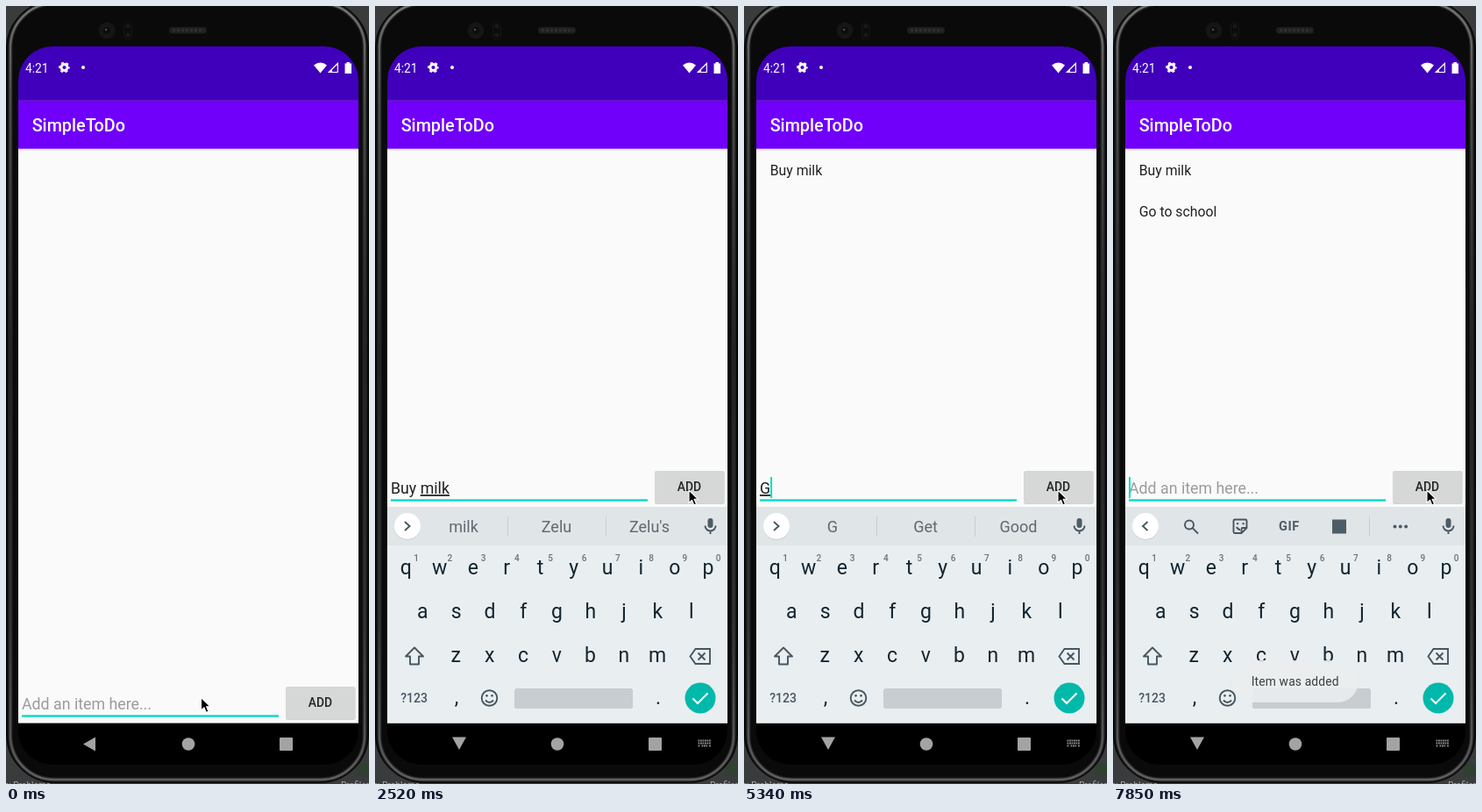
Animation, 414 px wide and 887 px high, one loop 8000 ms. Source, as an HTML page:

```html
<!DOCTYPE html>
<html lang="en">
<head>
<meta charset="utf-8">
<title>SimpleToDo</title>
<style>
  html, body { margin: 0; width: 100%; height: 100%; overflow: hidden; background: #2f3133; }
  svg { display: block; width: 100vw; height: 100vh; font-family: Roboto, sans-serif; }
  text { white-space: pre; }
  .mid { text-anchor: middle; }
  .medium { font-weight: 500; }
  .item { font-size: 15.8px; fill: #212121; }
  .field { font-size: 17.78px; }
  .composing { text-decoration: underline; text-decoration-thickness: 1px; text-decoration-skip-ink: none; }
  .suggestion { font-size: 18px; fill: #5f6a70; }
  .key { font-size: 23px; fill: #12252e; }
  .digit { font-size: 10px; font-weight: 500; fill: #68747a; }
  .line { fill: none; stroke: #465760; stroke-width: 1.9; }
  .solid { fill: #4d5d66; }
</style>
</head>
<body>
<svg viewBox="0 0 414 887" preserveAspectRatio="none">
  <defs>
    <clipPath id="screen"><rect x="14" y="46" width="388" height="819" rx="39"/></clipPath>
    <clipPath id="appArea"><rect x="14" y="46" width="388" height="771.6"/></clipPath>
    <linearGradient id="edge" x2="0" y2="1">
      <stop offset="0" stop-color="#777"/>
      <stop offset=".12" stop-color="#4c4c4c"/>
      <stop offset=".45" stop-color="#222"/>
      <stop offset=".8" stop-color="#333"/>
      <stop offset="1" stop-color="#606060"/>
    </linearGradient>
    <linearGradient id="barShadow" x2="0" y2="1">
      <stop offset="0" stop-color="#000" stop-opacity=".15"/>
      <stop offset="1" stop-color="#000" stop-opacity="0"/>
    </linearGradient>
  </defs>

  <!-- phone body -->
  <rect width="414" height="887" fill="#393b3d"/>
  <rect x="400" y="864" width="14" height="14" fill="#2f4030"/>
  <g font-size="10" fill="#aaa"><text x="-2" y="892">e: Problems</text><text x="382" y="892">Profiler</text></g>
  <rect x="1" y="-6" width="412" height="891" rx="55" fill="#111" stroke="#080808" stroke-width="2"/>
  <rect x="5" y="-3" width="404" height="885" rx="50" fill="#0a0a0b" stroke="#242424" stroke-width="5"/>
  <rect x="5" y="-3" width="404" height="885" rx="50" fill="none" stroke="url(#edge)" stroke-width="2.400"/>
  <circle cx="115" cy="28" r="9.500" fill="#151515"/>
  <circle cx="115" cy="28" r="5" fill="#0c0d0e" stroke="#1b1c1d"/>
  <circle cx="114" cy="27" r="1.200" fill="#4a5258"/>
  <rect x="134.500" y="18" width="9" height="21" rx="4.500" fill="#0c0c0c" stroke="#151515"/>
  <path d="M139 23v.1M139 33v.1" stroke="#191919" stroke-width="5" stroke-linecap="round"/>
  <rect x="186" y="24" width="43" height="7.500" rx="3.700" fill="#1f1f1f"/>
  <path d="M190 27.700h36" stroke="#303030" stroke-width="3" stroke-dasharray="3 2"/>

  <g clip-path="url(#screen)">
    <rect x="14" y="46" width="388" height="819" fill="#000"/>
    <rect x="14" y="107.600" width="388" height="710" fill="#fafafa"/>
    <rect x="14" y="46" width="388" height="61.600" fill="#4000bb"/>
    <rect x="14" y="107.600" width="388" height="55.100" fill="#7000fa"/>
    <rect x="14" y="162.700" width="388" height="3" fill="url(#barShadow)"/>

    <!-- status bar -->
    <g fill="#fff">
      <text x="22" y="75.500" font-size="13.800">4:21</text>
      <circle cx="66.500" cy="70" r="3.500" fill="none" stroke="#fff" stroke-width="2.800"/>
      <circle cx="66.500" cy="70" r="5.300" fill="none" stroke="#fff" stroke-width="2" stroke-dasharray="2.800 2.750" stroke-dashoffset="1.400"/>
      <circle cx="88" cy="70" r="2"/>
      <path d="M351 67.500Q358.500 61.500 366 67.500L358.500 76.500Z"/>
      <path d="M378.300 65.500V75.500H368.300Z" fill="none" stroke="#fff" stroke-width="1.200"/>
      <path d="M372 72V76H367.500Z"/>
      <path d="M386.500 65.500h2v-1.500h3.500v1.500h2v11.500h-7.500Z"/>
      <text class="medium" x="29.700" y="143" font-size="19.760">SimpleToDo</text>
    </g>

    <!-- list -->
    <text class="item" id="item1" x="29.700" y="192.500">Buy milk</text>
    <text class="item" id="item2" x="29.700" y="240">Go to school</text>

    <!-- input row, placed for the open keyboard -->
    <g id="inputRow">
      <text class="field" id="hint" x="18" y="556" fill="#9b9b9b">Add an item here...</text>
      <text class="field" id="entry" x="18" y="556" fill="#212121"><tspan id="done"></tspan><tspan id="composing" class="composing"></tspan></text>
      <rect x="18" y="562.300" width="293" height="2.400" fill="#05dcc8"/>
      <rect id="caret" y="537" width="2" height="24" fill="#05dcc8"/>
      <rect x="319" y="531" width="79.500" height="37" rx="2" fill="#000" opacity=".16"/>
      <rect id="button" x="319" y="530" width="79.500" height="37" rx="2"/>
      <text class="medium mid" x="358.500" y="553.300" font-size="13.830" fill="#222">ADD</text>
    </g>

    <!-- keyboard -->
    <g clip-path="url(#appArea)">
      <g id="keyboard">
        <rect x="14" y="571" width="388" height="247" fill="#e9eef1"/>
        <rect x="14" y="571" width="388" height="44" fill="#e0e5e8"/>
        <circle cx="37" cy="594" r="15" fill="#000" opacity=".1"/>
        <circle cx="37" cy="593" r="15" fill="#fff"/>
        <path id="chevron" class="line"/>
        <rect class="solid" x="379.500" y="584" width="6" height="11" rx="3"/>
        <path class="line" d="M376.500 592.500a6 6 0 0 0 12 0M382.500 598.500v3.500" stroke-width="1.700"/>

        <g id="suggestions">
          <path d="M151.500 582v23M263.500 582v23" stroke="#c8ced1"/>
          <text class="suggestion mid" x="101" y="600"></text>
          <text class="suggestion mid" x="207" y="600"></text>
          <text class="suggestion mid" x="313" y="600"></text>
        </g>
        <g id="tools">
          <circle class="line" cx="87" cy="591.500" r="5"/>
          <path class="line" d="M90.700 595.200L97 601.500" stroke-width="2.300"/>
          <path class="line" d="M139 585.500h12q1.500 0 1.500 1.500v8l-6 6h-7.500q-1.500 0-1.500-1.500v-12.500q0-1.500 1.500-1.500ZM152.500 595h-4.500q-1.500 0-1.500 1.500v4.500M141 594q1.500 3 4 3" stroke-width="1.700"/>
          <path class="solid" d="M141 589h2.200v2.200h-2.200ZM147.500 589h2.200v2.200h-2.200Z"/>
          <text class="solid mid" x="201" y="598.300" font-size="14.500" font-weight="700" letter-spacing=".6">GIF</text>
          <rect class="solid" x="250" y="585.500" width="16" height="16"/>
          <path d="M292.500 582v23" stroke="#c8ced1"/>
          <path d="M321.500 593.500h.01M327.800 593.500h.01M334.100 593.500h.01" stroke="#4d5d66" stroke-width="4" stroke-linecap="round"/>
        </g>

        <g id="keys"></g>
        <path class="line" d="M45 731.500L55 741.500H50V750.500H40V741.500H35Z" stroke-linejoin="round"/>
        <path class="line" d="M365.500 733H382V750H365.500L359.500 741.500ZM368.500 737.500l8 8M376.500 737.500l-8 8"/>
        <text class="medium mid" x="44.500" y="794" font-size="14" fill="#465760">?123</text>
        <circle class="line" cx="130.500" cy="789" r="8.800"/>
        <path class="line" d="M126 791.500q4.500 5 9 0" stroke-width="1.700"/>
        <path d="M127.500 786.300h.01M133.500 786.300h.01" stroke="#465760" stroke-width="2.800" stroke-linecap="round"/>
        <rect x="159" y="778" width="135" height="23" rx="2.500" fill="#c8cdd1"/>
        <circle cx="371" cy="789" r="17.500" fill="#00b9aa"/>
        <path d="M362.500 789.500l5.500 5.500l11.500-11.500" fill="none" stroke="#fff" stroke-width="2.100"/>
      </g>
    </g>

    <g id="toast">
      <rect x="134" y="746.500" width="147" height="48" rx="24" fill="#000" opacity=".025"/>
      <rect x="135" y="746" width="145" height="48" rx="24" fill="#ebeeef"/>
      <text class="mid" x="207.700" y="775" font-size="13.830" fill="#2c2c2c" letter-spacing=".15">Item was added</text>
    </g>

    <!-- navigation bar -->
    <g fill="#a3a3a3">
      <path id="back"/>
      <circle cx="208" cy="841.500" r="7.300"/>
      <rect x="312" y="834" width="15" height="15" rx="1"/>
      <path id="keyboardIcon" d="M368.500 837.500h14.500M368.500 840.500h14.500M368.500 843.500h2M372.500 843.500h6.500M381 843.500h2" stroke="#8c8c8c" stroke-width="1.800" stroke-dasharray="1.800 .7"/>
    </g>
  </g>

  <path id="pointer" d="M0 0V14.500L3.400 11.300L5.800 17L8.500 15.800L6.100 10.300H10.500Z" fill="#000" stroke="#fff" stroke-width="1.100" stroke-linejoin="round"/>
</svg>

<script>
const LOOP = 8000, STEP = LOOP / 54;
const $ = id => document.getElementById(id);

// [time, finished text, word being composed, suggestions]; no suggestions shows the tool strip
const typing = [
  [0, "", "", ""],
  [887, "Buy ", "", "it a the"],
  [1035, "Buy ", "m", "m my more"],
  [1183, "Buy ", "mi", "mi mine might"],
  [1331, "Buy ", "mil", "mil milk miles"],
  [1479, "Buy ", "milk", "mil milk miles"],
  [1627, "Buy ", "milk", "milk Zelu Zelu's"],
  [2813, "", "", ""],
  [5331, "", "G", "G Get Good"],
  [5480, "", "Go", "Go Good Going"],
  [5628, "Go ", "", "to for back"],
  [5776, "Go ", "t", "t to tomorrow"],
  [5924, "Go to ", "", "the bed sleep"],
  [6068, "Go to ", "s", "s sleep school"],
  [6217, "Go to ", "sc", "sc school schools"],
  [6365, "Go to ", "sch", "sch school schools"],
  [6510, "Go to ", "scho", "scho school schools"],
  [6658, "Go to ", "schoo", "schoo school schools"],
  [6806, "Go to ", "school", "school schools schooling"],
  [7550, "", "", ""]
];
const caretTrack = [[0, 0], [295, 1], [2074, 0], [2665, 1], [3255, 0], [3855, 1], [4295, 0], [4745, 1], [7257, 0], [7550, 1]];
const toastTrack = [[0, 0], [2960, .3], [3115, .9], [3255, 1], [4888, .7], [5036, .25], [5184, 0], [7698, .3], [7845, .9]];
const pressTrack = [[0, 0], [2665, 1], [2813, 0], [7404, 1], [7550, 0]];
// how far the keyboard still has to slide up
const slideTrack = [[0, 247], [440, 80], [588, 0]];

const at = (track, t) => track.findLast(entry => entry[0] <= t);
const show = (id, visible) => $(id).setAttribute("visibility", visible ? "visible" : "hidden");
const move = (id, x, y) => $(id).setAttribute("transform", `translate(${x} ${y})`);

function addKey(label, x, y, kind = "key") {
  $("keys").insertAdjacentHTML("beforeend", `<text class="${kind} mid" x="${x}" y="${y}">${label}</text>`);
}
[["qwertyuiop", 35.3, 648], ["asdfghjkl", 54.3, 698], ["zxcvbnm", 92.3, 748]].forEach(([row, left, y]) =>
  [...row].forEach((letter, i) => addKey(letter, left + 38.3 * i, y)));
[..."1234567890"].forEach((digit, i) => addKey(digit, 47 + 38.3 * i, 632.5, "digit"));
addKey(",", 93, 796);
addKey(".", 323, 796);

function draw(t) {
  const [, done, composing, words] = at(typing, t);
  const slide = at(slideTrack, t)[1];
  const open = slide < 247;

  $("done").textContent = done;
  $("composing").textContent = composing;
  show("hint", !done && !composing);
  $("caret").setAttribute("x", 18 + (done || composing ? $("entry").getComputedTextLength() : 0));
  show("caret", at(caretTrack, t)[1]);
  $("button").setAttribute("fill", at(pressTrack, t)[1] ? "#c3c4c4" : "#d6d7d7");
  move("inputRow", 0, open ? 0 : 246);

  show("item1", t >= 2813);
  show("item2", t >= 7550);

  show("keyboard", open);
  move("keyboard", 0, slide);
  $("suggestions").style.display = words ? "" : "none";
  $("tools").style.display = words ? "none" : "";
  $("chevron").setAttribute("d", words ? "M34 588l5.500 5l-5.500 5" : "M39.500 588l-5.500 5l5.500 5");
  const parts = words.split(" ");
  document.querySelectorAll(".suggestion").forEach((slot, i) => slot.textContent = parts[i] || "");

  $("toast").setAttribute("opacity", at(toastTrack, t)[1]);
  $("back").setAttribute("d", open ? "M88 833.500H104L96 848Z" : "M88 841.500L102 833.500V849.500Z");
  show("keyboardIcon", open);

  const tick = Math.floor((t + 6) / STEP) * STEP;
  const p = Math.min(1, Math.max(0, (tick - 1780) / 640));
  const eased = p * p * (3 - 2 * p);
  move("pointer", 222.5 + 135.5 * eased, 788.5 - 236.5 * eased);
}

function frame() {
  draw(performance.now() % LOOP);
  requestAnimationFrame(frame);
}
frame();
</script>
</body>
</html>
```
